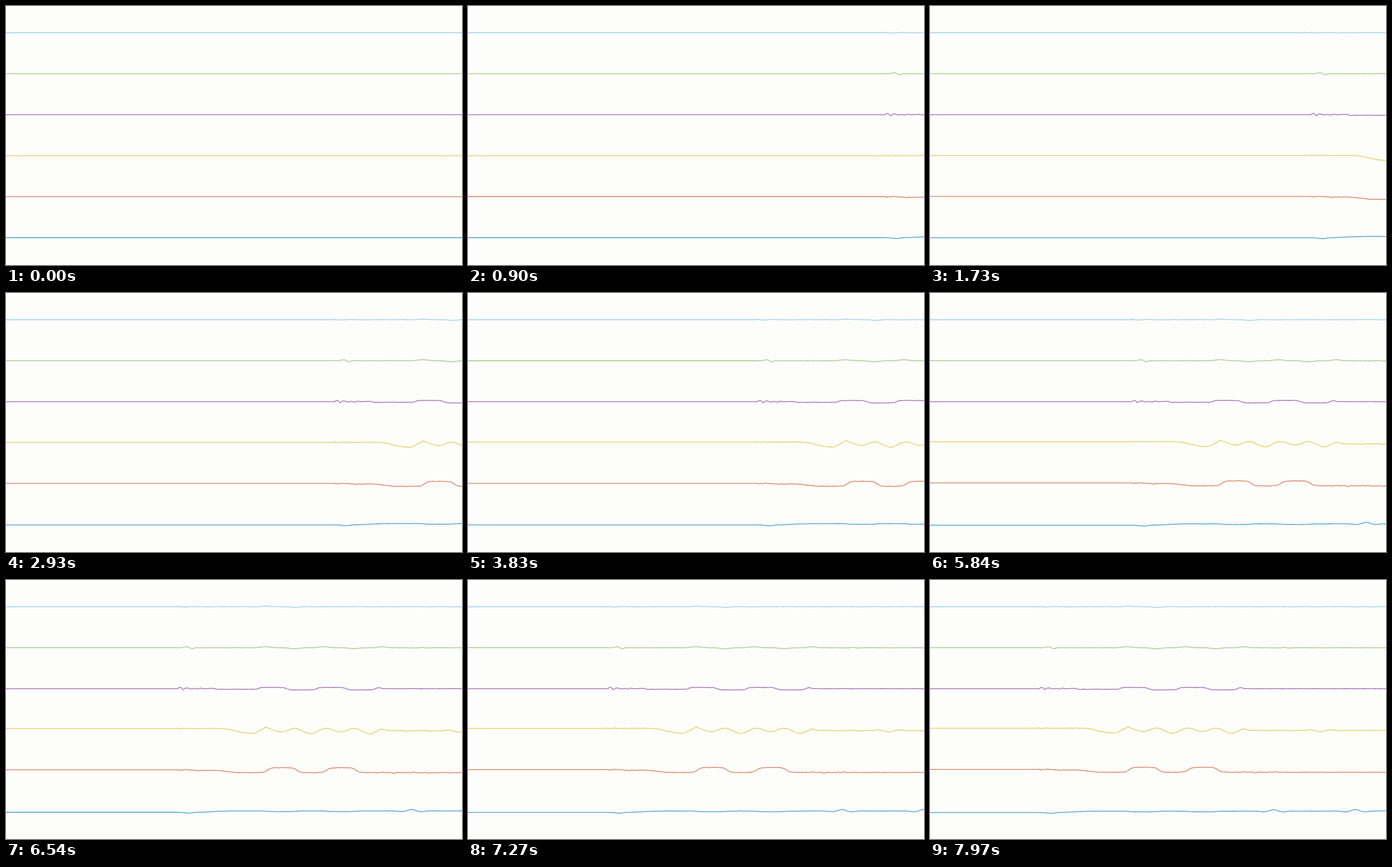
These frames come from a looping animation (724 px wide and 412 px high, 8 s). An HTML page:

```html
<!DOCTYPE html>
<html lang="en">
<head>
<meta charset="utf-8">
<title>Six scrolling traces</title>
<style>
  html, body { margin: 0; width: 100%; height: 100%; overflow: hidden; background: #fdfdfb; }
  svg { display: block; }
</style>
</head>
<body>
<svg id="stage" width="724" height="412" viewBox="0 0 724 412"></svg>
<script>
const W = 724, LOOP = 8000, SPEED = 0.0691, LEN = 560;
const TOP = 42.5, GAP = 65.2;
const PERIOD = 94, TURN = 2 * Math.PI / PERIOD;
const { sin, cos, exp, tanh, floor, min, max } = Math;
const stage = document.getElementById('stage');
const traces = [];

const clamp = (u, a, b) => max(a, min(b, u));
const rand = n => {
  const s = sin(n * 127.1) * 43758.5453;
  return (s - floor(s)) * 2 - 1;
};
const noise = (u, seed) => {
  const k = floor(u / 3) + seed, f = u / 3 % 1;
  return rand(k) * (1 - f) + rand(k + 1) * f;
};

// u is the distance in px from the onset of the signal
const rise = (u, a, b) => {
  const x = clamp((u - a) / (b - a), 0, 1);
  return x * x * (3 - 2 * x);
};
const span = (u, a, b) => rise(u, a - 4, a + 4) - rise(u, b - 4, b + 4);
const pulse = (u, at, width) => exp(-(((u - at) / width) ** 2));
const ripple = (u, at) => pulse(u, at, 20) * cos((u - at) * Math.PI / 18);

// two rounds of a gesture, at rest (-1) before and after
const swing = u => tanh(2.6 * sin((clamp(u, 119.5, 307.5) - 143) * TURN));

// double dip in each round, every second one deeper
const dips = u => {
  const p = clamp(u, 117, 325);
  return 3.2 - 3.4 * cos((p - 141) * 2 * TURN) + 1.3 * cos((p - 117) * TURN);
};

function addTrace(color, shape, shake) {
  const seed = traces.length * 300;
  const values = [], sums = [0];
  for (let u = 0; u <= LEN; u++) {
    values.push(shape(u) + noise(u, seed) * shake(u));
    sums.push(sums[u] + values[u]);
  }
  const path = document.createElementNS('http://www.w3.org/2000/svg', 'path');
  const style = { fill: 'none', stroke: color, 'stroke-width': 1.3, 'stroke-linejoin': 'round' };
  for (const name in style) path.setAttribute(name, style[name]);
  stage.append(path);
  traces.push({ path, values, sums, y: TOP + GAP * traces.length });
}

addTrace('#a2d0ee',
  u => -1.1 * span(u, 130, 205) * cos((u - 141) * TURN) ** 9,
  u => 0.2 + 0.7 * exp(-u / 40));

addTrace('#a6cc88',
  u => 1.6 * (pulse(u, 23, 4) - pulse(u, 15, 5))
    - 1.5 * span(u, 125, 335) * cos((u - 139) * TURN) ** 3,
  u => 0.25 + 0.3 * pulse(u, 360, 50));

addTrace('#a272b8',
  u => rise(u, 55, 68) * (1 - rise(u, 122, 130))
    - 2 * span(u, 126, 323) * tanh(3 * sin((u - 127) * TURN)),
  u => 0.2 + 2.2 * exp(-u / 30));

addTrace('#e6cf62',
  u => {
    const tail = rise(u, 322, 336);
    return rise(u, 70, 117) * dips(u) * (1 - tail) + 3.5 * tail
      - 2 * pulse(u, 141, 3) + 2.1 * ripple(u, 447);
  },
  u => 0.3 + 0.8 * exp(-u / 30) + 0.7 * pulse(u, 360, 40));

addTrace('#d68664',
  u => rise(u, 0, 30) + rise(u, 60, 100) * (-0.4 - 4 * swing(u)),
  u => 0.35 + 0.9 * exp(-u / 30) + 1.3 * pulse(u, 355, 30));

addTrace('#4ca6ca',
  u => 1.4 * pulse(u, 18, 8) + rise(u, 25, 90) * (-1.6 + 0.55 * swing(u))
    - 2.3 * (ripple(u, 372) + ripple(u, 502)) - pulse(u, 556, 12),
  u => 0.12);

function draw(t) {
  const onset = W - SPEED * t;
  const count = min(LEN, Math.ceil(SPEED * t));
  for (const { path, values, sums, y } of traces) {
    // each trace stays centred on its mean over the window
    const base = y - sums[count] / W;
    let d = `M0 ${base.toFixed(2)}L${onset.toFixed(2)} ${base.toFixed(2)}`;
    for (let u = 0; u <= count; u++) d += `L${(onset + u).toFixed(2)} ${(base + values[u]).toFixed(2)}`;
    path.setAttribute('d', d);
  }
}

const start = performance.now();
function tick() {
  draw((performance.now() - start) % LOOP);
  requestAnimationFrame(tick);
}
tick();
</script>
</body>
</html>
```
